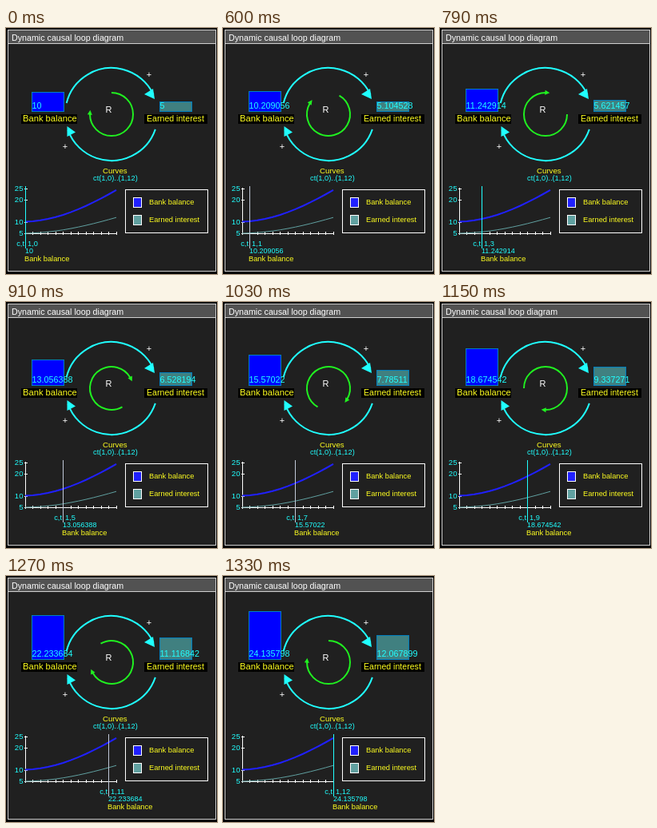
An HTML page with a canvas for the animation above (1730 ms loop, 264 px wide and 308 px high).

```html
<!DOCTYPE html>
<html lang="en">
<head>
<meta charset="utf-8">
<title>Dynamic causal loop diagram</title>
<style>
html, body { margin: 0; width: 264px; height: 308px; overflow: hidden; background: #000; }
canvas { display: block; }
</style>
</head>
<body>
<canvas id="stage" width="264" height="308"></canvas>
<script>
const ctx = document.getElementById('stage').getContext('2d');
const CYAN = '#20ffff', YELLOW = '#ffff20', WHITE = '#fff', GREEN = '#20f020';
const BLUE = '#0000ff', TEAL = '#408080';
const LOOP = 1730, STEPS = 12, TURN = Math.PI / 180;

// The interest grows by a sine of the step; the balance is twice the interest.
const interest = [5];
for (let i = 1; i <= STEPS; i++) interest.push(interest[i - 1] + Math.sin(6 * i * TURN));
const earned = interest.map(v => +v.toFixed(6));
const balance = earned.map(v => +(2 * v).toFixed(6));

const chartX = i => 24 + 9.5 * i;
const chartY = v => 257 - 2.8 * (v - 5);

function stepAt(ms) {
  if (ms < 600) return 0;
  if (ms < 730) return 1;
  return Math.min(STEPS, 2 + Math.floor((ms - 730) / 60));
}

function rect(x, y, w, h, fill) {
  ctx.fillStyle = fill;
  ctx.fillRect(x, y, w, h);
}

function frame(x, y, w, h, color) {
  ctx.strokeStyle = color;
  ctx.lineWidth = 1;
  ctx.strokeRect(x + 0.5, y + 0.5, w - 1, h - 1);
}

function text(str, x, y, size, color, align = 'left') {
  ctx.font = `${size}px "Liberation Sans", Arial, sans-serif`;
  ctx.textAlign = align;
  ctx.fillStyle = color;
  ctx.fillText(str, x, y);
}

function path(points, color, width) {
  ctx.beginPath();
  points.forEach(([x, y]) => ctx.lineTo(x, y));
  ctx.strokeStyle = color;
  ctx.lineWidth = width;
  ctx.stroke();
}

function triangle(points, color) {
  ctx.beginPath();
  points.forEach(([x, y]) => ctx.lineTo(x, y));
  ctx.fillStyle = color;
  ctx.fill();
}

function arc(x, y, r, from, to, color) {
  ctx.beginPath();
  ctx.arc(x, y, r, from * TURN, to * TURN);
  ctx.strokeStyle = color;
  ctx.lineWidth = 2;
  ctx.stroke();
}

function drawWindow() {
  rect(0, 0, 264, 308, '#000');
  rect(2, 2, 261, 303, '#202020');
  rect(2, 2, 261, 17, '#525252');
  frame(2, 2, 261, 303, '#d0d0d0');
  rect(2, 19, 261, 1, '#d0d0d0');
  text('Dynamic causal loop diagram', 7, 16, 10.7, WHITE);
}

function drawLoop(step) {
  arc(132, 108, 58, 194, 335, CYAN);
  arc(132, 108, 58, 19, 160, CYAN);
  triangle([[186, 89], [173, 83], [184, 76]], CYAN);
  triangle([[76.5, 123], [76.5, 136], [87, 130.5]], CYAN);
  text('+', 179, 61.5, 11, WHITE, 'center');
  text('+', 74, 151.5, 11, WHITE, 'center');

  const tail = 30 * step - 90, tip = tail + 275;
  arc(132, 108, 27, tail, tip, GREEN);
  ctx.save();
  ctx.translate(132, 108);
  ctx.rotate(tip * TURN);
  triangle([[27, 3], [24, -3], [30, -3]], GREEN);
  ctx.restore();
  text('R', 124.5, 106, 11, WHITE);
}

function drawBar(x, w, value, fill) {
  const top = Math.floor(105 - 2.5 * value);
  rect(x, top, w, 105 - top, fill);
  frame(x, top, w, 105 - top, '#0080c0');
  text(value, x + 0.5, 101, 10.8, CYAN);
}

function drawStocks(step) {
  drawBar(32, 41, balance[step], BLUE);
  drawBar(192, 41, earned[step], TEAL);
  rect(19, 108, 70, 12, '#000');
  rect(173, 108, 79, 12, '#000');
  text('Bank balance', 21, 117, 11.2, YELLOW);
  text('Earned interest', 176, 117, 10.6, YELLOW);
}

function drawChart(step) {
  text('Curves', 121, 182, 9.7, YELLOW);
  text('ct(1,0)..(1,12)', 109, 191, 9.3, CYAN);
  rect(24, 200, 1, 58, WHITE);
  rect(24, 257, 115, 1, WHITE);
  for (let i = 0; i <= STEPS; i++) rect(Math.floor(chartX(i)), 255, 1, 4, WHITE);
  for (const v of [25, 20, 10, 5]) {
    const y = Math.round(chartY(v));
    rect(23, y, 4, 1, WHITE);
    text(v, 21.5, y + 3, 9.6, CYAN, 'right');
  }
  path(balance.map((v, i) => [chartX(i), chartY(v) - 0.5]), '#2020ff', 2);
  path(earned.map((v, i) => [chartX(i), chartY(v)]), '#60a0a0', 1);

  const x = Math.floor(chartX(step));
  rect(x, 198, 1, 78, step % 3 ? '#c0c8d8' : CYAN);
  text('c,t', x - 1, 273, 9.3, CYAN, 'right');
  text(`1,${step}`, x + 3, 273, 9.3, CYAN);
  text(balance[step], x, 282, 9, CYAN);
  text('Bank balance', x - 1, 292, 9.3, YELLOW);
}

function drawLegend() {
  frame(149, 202, 104, 55, WHITE);
  [['Bank balance', 212, '#2020ff'], ['Earned interest', 234, '#60a0a0']].forEach(([name, y, color]) => {
    rect(159, y, 11, 13, color);
    frame(159, y, 11, 13, WHITE);
    text(name, 179, y + 9, 9.3, YELLOW);
  });
}

function draw(now) {
  const step = stepAt(now % LOOP);
  drawWindow();
  drawLoop(step);
  drawStocks(step);
  drawChart(step);
  drawLegend();
}

const start = performance.now();
function tick() {
  draw(performance.now() - start);
  requestAnimationFrame(tick);
}
tick();
</script>
</body>
</html>
```
